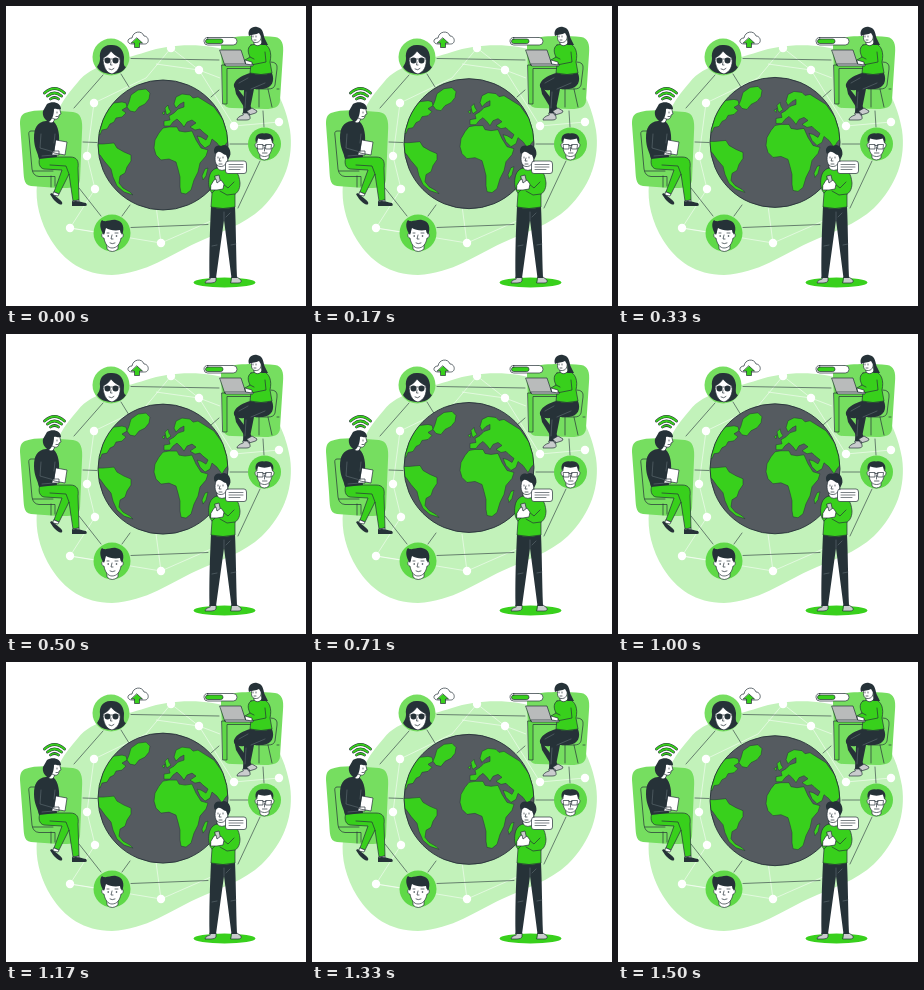
An HTML page for the animation above (1.54 s loop, 300x300 px).

```html
<!DOCTYPE html>
<html lang="en">
<head>
<meta charset="utf-8">
<title>Connected world</title>
<style>
html, body { margin: 0; width: 100%; height: 100%; overflow: hidden; background: #fff; }
svg { display: block; width: 100%; height: 100%; }
.g { fill: #38d01c; }
.m { fill: #76de60; }
.n { fill: #5fd947; }
.d { fill: #263238; }
.w { fill: #fff; }
.s { fill: #c9cccd; }
.o { stroke: #263238; stroke-width: .7; stroke-linejoin: round; stroke-linecap: round; }
.l { fill: none; stroke: #263238; stroke-width: .7; stroke-linecap: round; stroke-linejoin: round; }
.fold { fill: none; stroke: #6d7a80; stroke-width: .5; stroke-linecap: round; }
.net { fill: none; stroke: #fff; stroke-width: .7; opacity: .75; }
.land { stroke: #263238; stroke-width: .5; stroke-linejoin: round; }
</style>
</head>
<body>
<svg viewBox="0 0 300 300" xmlns="http://www.w3.org/2000/svg">
  <defs>
    <clipPath id="disc"><circle cx="157" cy="139" r="65"/></clipPath>
  </defs>

  <path fill="#c2f2ba" d="M72 76C86 58 116 54 140 46C165 38 200 36 228 47C258 59 278 88 284 124C288 152 279 179 256 202C238 219 214 226 190 237C164 249 141 267 106 269C78 269 58 255 45 234C34 216 29 196 31 178C34 158 46 144 47 126C48 106 58 92 72 76Z"/>

  <path class="net" d="M88 97L140 72L165 42L193 64L228 120L273 116M193 64L150 58M88 97L81 150L89 183L64 222L155 237L205 215M155 237L150 200M193 64L214 72M64 222L90 226"/>
  <g id="nodes" class="w"></g>

  <path class="l" stroke-opacity=".85" d="M125 52.500L213 54M97 69L68 102M115 68L123 81M77 136L91 136.500M73 182L95 210M124 199L116 210M125 221.500L202 218.500M224 138H242M257 105L258 121M254 155L232 202M205 91L213 84"/>

  <g id="globe">
    <circle cx="157" cy="139" r="65" fill="#555b60"/>
    <g class="g land" clip-path="url(#disc)">
      <path d="M88 127L100 103L108 97L116 96L120 97L121 101L116 104L120 107L116 111L110 112L108 116L104 118L101 123L96 124L94 129Z"/>
      <path d="M123 96L125 89L132 84L140 83L144 87L143 93L139 98L133 101L129 106L124 105L121 101Z"/>
      <path d="M88 138L97 138L108 137L111 142L118 146L125 149L125 155L121 161L119 167L114 170L113 177L117 182L124 186L127 189L118 186L111 180L107 171L105 163L99 156L94 149L88 146Z"/>
      <path d="M157 122L163 121L171 121L173 125L179 126L186 125L190 134L195 142L202 144L200 150L194 157L192 166L188 174L185 184L180 188L175 187L174 181L174 171L172 163L170 156L163 153L155 154L150 149L148 142L149 134L153 127Z"/>
      <path d="M158 120L158 115L164 114L163 110L168 107L172 103L178 101L178 96L174 98L170 102L168 98L170 91L176 88L184 89L187 92L192 91L200 96L208 101L218 115L225 132L219 139L216 144L211 137L206 133L204 139L199 142L194 137L191 130L195 131L200 134L202 130L197 126L194 123L189 124L184 121L190 117L186 114L181 116L178 121L175 117L171 113L167 116L164 120Z"/>
      <path d="M160 107L159 102L162 99L163 103L165 106L161 109ZM156 107L159 105L158 109ZM196 170L199 163L202 162L200 170L197 174Z"/>
    </g>
    <circle cx="157" cy="139" r="65" fill="none" stroke="#263238" stroke-width=".9"/>
  </g>

  <!-- Woman in sunglasses -->
  <circle class="m" cx="105" cy="51" r="18.500"/>
  <path class="d" d="M106 39C97 38 93 45 94 52C94 57 92 59 91 61C94 66 100 68 106 68C112 68 117 66 120 61C117 60 118 56 118 51C117 43 113 39 106 39Z"/>
  <path class="w o" d="M97 52C101 50 103 48 105 45C108 49 111 50 114 52C115 60 112 66 106 68C100 67 97 60 97 52Z"/>
  <circle class="d" cx="101.500" cy="54.500" r="3"/>
  <circle class="d" cx="109.500" cy="54.500" r="3"/>
  <path class="l" d="M97 53H114M105 56L104.500 59H106M103 63Q106 65 108 62.500"/>

  <!-- Short-haired man -->
  <circle class="n" cx="106" cy="227" r="18.500"/>
  <path class="w o" d="M101 236V243Q106 248 112 243V235Z"/>
  <path class="w o" d="M98 227C95 226 95 232 98 232C99 238 102 242 106 242C111 242 114 238 115 232C118 232 118 226 115 227L114 219H99Z"/>
  <path class="d" d="M98 229C94 224 93 217 96 214C99 217 105 213 110 214C117 215 119 222 116 229L114 224C109 225 103 224 100 222Z"/>
  <path class="l" d="M101 227H103M109 227H112M106 229L105 233H107M104 237Q106 238.500 109 237"/>
  <circle class="d" cx="102.200" cy="230" r=".8"/>
  <circle class="d" cx="110.500" cy="230" r=".8"/>

  <!-- Man with glasses -->
  <circle class="n" cx="258.500" cy="138" r="16.500"/>
  <path class="w o" d="M254 147V152Q258 156 263 152V147Z"/>
  <path class="w o" d="M250.500 137C248 137 249 142 251 142C252 147 254 150.500 258.500 150.500C263 150.500 265 147 266 142C268 142 269 137 266.500 137L265 131H252Z"/>
  <path class="d" d="M250 137C248 130 252 126.500 258 127.500C264 126 269 130 267 137L265 132.500C261 134 256 134 252 132.500Z"/>
  <path class="l" d="M251.500 138.500H257V143H252ZM260 138.500H265.500L265 143H260ZM257 139.500H260M258.500 141V145M256.500 147H261"/>

  <!-- Cloud upload -->
  <path class="w o" d="M126 38C120 38 121 32 126 32C127 25 136 24 138 30C143 30 144 38 139 38Z"/>
  <path class="g o" d="M131 32L136.500 37H133.500V41.500H128.500V37H125.500Z"/>

  <!-- Seated reader -->
  <path class="m" d="M19 107C32 102 52 105 67 106C75 107 77 114 76 126L74 174C73 183 63 182 52 182L25 180C17 179 18 171 17 158L14 118C14 112 15 109 19 107Z"/>
  <path class="l" d="M31 125H25Q22 125 23 130L26 163Q27 170 33 170.500H49V180M31 130L33 151M45 170V181M27 165H47"/>
  <path class="g o" d="M34 151L64 151C71 151 73 155 72 162L73 194L67 195L63 168L53 188L48 186L56 164L38 163C33 162 32 156 34 151Z"/>
  <path class="l" d="M63 168L60 160L44 159"/>
  <path class="w o" d="M48 186L53 188L52 190L47 189ZM67 195L73 194V197H67Z"/>
  <path class="d" d="M46 187C48 190 52 191 56 196Q57 199 54 198.500C50 197 46 192 44 188ZM66 195.500C71 194 75 196 80 197Q82 200 79 200H66Z"/>
  <path class="d" d="M40 115C31 116 28 122 28 132C28 142 32 147 33 153L51 151L50 143L53 136C54 127 51 116 46 115Z"/>
  <path class="fold" d="M35 128L34 142L48 146M49 128L48 137M36 150L48 149"/>
  <path class="w o" d="M43 108L42 115Q45 119 48 115L49 112Z"/>
  <path class="w o" d="M44 100C49 97 54 99 54 104L55 108L53 109C53 114 49 114 46 112Z"/>
  <path class="d" d="M41 98C47 94 55 97 55 103C51 104 50 102 48 103C48 109 46 114 43 116C39 114 36 110 37 105Z"/>
  <path class="l" d="M51 106V107M50 110.500H52"/>
  <path class="w o" d="M50 134L61 136L59 149L48 147ZM47 145L53 145L53 149L46 149Z"/>
  <path class="l" style="stroke-width:2.800" d="M38.500 87Q48.500 78 58.500 87M41.500 90Q48.500 84 55.500 90M44.500 93Q48.500 90 52.500 93"/>
  <path class="l" style="stroke:#38d01c;stroke-width:1.700" d="M38.500 87Q48.500 78 58.500 87M41.500 90Q48.500 84 55.500 90M44.500 93Q48.500 90 52.500 93"/>

  <!-- Laptop worker -->
  <path class="m" d="M220 33C233 29 255 30 269 31C276 32 278 38 277 48L274 94C274 101 268 103 259 103L226 102C217 102 217 97 217 87L215 42C215 36 216 34 220 33Z"/>
  <path class="n o" d="M216 59H250V62.500H221V98H217Z"/>
  <path class="l" d="M265 56Q272 56 271 63L269 79Q268 83 262 83H250M253 83V101M271 83H273M262 83L266 101"/>
  <path class="d" d="M244 67H266C269 75 266 82 257 83L248 83L243 108L237 107L238 84C231 85 227 82 228 78C230 72 238 69 244 67Z"/>
  <path class="d" d="M228 78L242 96L246 103L241 106L230 88Z"/>
  <path class="fold" d="M245 83L259 77M242 72L233 77M240 86L239 102"/>
  <path class="s o" d="M237 107L243 107L244 111Q245 114 240 114H231Q231 111 237 109ZM241 105L246 102L251 105Q251 107 248 107.500L243 109Z"/>
  <path class="g o" d="M245 39L256 37C264 39 266 47 264 56L266 67Q255 70 244 67L245 58L239 57L239 54L244 51C241 45 242 41 245 39Z"/>
  <path class="l" d="M259 46L260 56L245 59M244 51L248 53"/>
  <path class="w o" d="M248 33V38Q252 42 256 37L255 31Z"/>
  <path class="w o" d="M246 27C245 31 245 36 249 36.500C254 37 256 33 255 27L250 24Z"/>
  <path class="d" d="M243 30C241 24 246 20 251 21C258 22 257 29 259 33L262 39L255 39C257 33 255 30 253 27C250 29 246 28 243 30Z"/>
  <path class="l" d="M247 30V31M250 30V31M248 34H250"/>
  <path class="o" fill="#b9bbbb" d="M214 44H235L240 59H219Z"/>
  <path class="s o" d="M219 58H247V60H220Z"/>
  <path class="w o" d="M239 54L246 56L246 59L240 58Z"/>
  <rect class="w o" x="198" y="31.500" width="33" height="7.500" rx="3.750"/>
  <rect class="g o" x="199.500" y="33" width="17.500" height="4.500" rx="2.250"/>

  <!-- Standing man -->
  <ellipse class="g" cx="218.500" cy="276.500" rx="31" ry="5"/>
  <path class="s o" d="M204 271H210V275Q209 277 205 277H199Q199 274 204 273ZM226 271H231L235 274Q236 277 232 277H225Z"/>
  <path class="d" d="M205 200H229C230 221 230 246 231 272H225.500L218 214L210 272H203.500C203 248 204 222 205 200Z"/>
  <path class="fold" d="M218 206V214M206 240L211 239M225 239L230 238M220 211L224 207"/>
  <path class="w o" d="M211 155V164Q217 168 221 162L220 154Z"/>
  <path class="g o" d="M211 162Q216 167 221 162C230 163 233 167 234 177C234 184 231 187 229 188V201Q217 204 205 201L206 187C203 184 202 178 203 172C204 166 207 163 211 162Z"/>
  <path class="l" d="M228 176L222 182L217 178M229 188L221 189L214 185M206 187L210 183"/>
  <path class="w o" d="M210 147C208 153 209 160 214 160.500C219 161 222 156 222 151L224 148L220 143H211Z"/>
  <path class="d" d="M209 148C206 143 210 138 215 140C221 136 226 144 224 150L222 154L220 149C217 149 215 145 212 146Z"/>
  <path class="l" d="M212 151V152M217 151V152M214 152L213 155H215M213 158H216"/>
  <path class="s o" d="M209 170L213 169L215 178L211 180Z"/>
  <path class="w o" d="M205 179L208 174L210 173L211 177L215 174L218 178L217 183L211 184L205 184Z"/>
  <path class="w o" d="M222 155H238Q240.500 155 240.500 158V165Q240.500 167.500 238 167.500H222Q219.500 167.500 219.500 165V158Q219.500 155 222 155Z"/>
  <path class="l" style="stroke-width:.6" d="M223 158.500H237M223 161H237M223 163.500H234"/>
</svg>
<script>
const LOOP = 1540;
const LIFT = 6;
const globe = document.getElementById('globe');
const nodes = [[88, 97], [193, 64], [228, 120], [273, 116], [81, 150], [89, 183], [64, 222], [155, 237], [165, 42]];

document.getElementById('nodes').innerHTML =
  nodes.map(([x, y]) => `<circle cx="${x}" cy="${y}" r="4.200"/>`).join('');

// The globe rises and sinks at a steady speed, once per loop.
function draw(ms) {
  const t = (ms % LOOP) / LOOP;
  const y = LIFT * (Math.abs(2 * t - 1) - 1);
  globe.setAttribute('transform', `translate(0 ${y.toFixed(2)})`);
}

const start = performance.now();
function tick() {
  draw(performance.now() - start);
  requestAnimationFrame(tick);
}
tick();
</script>
</body>
</html>
```
